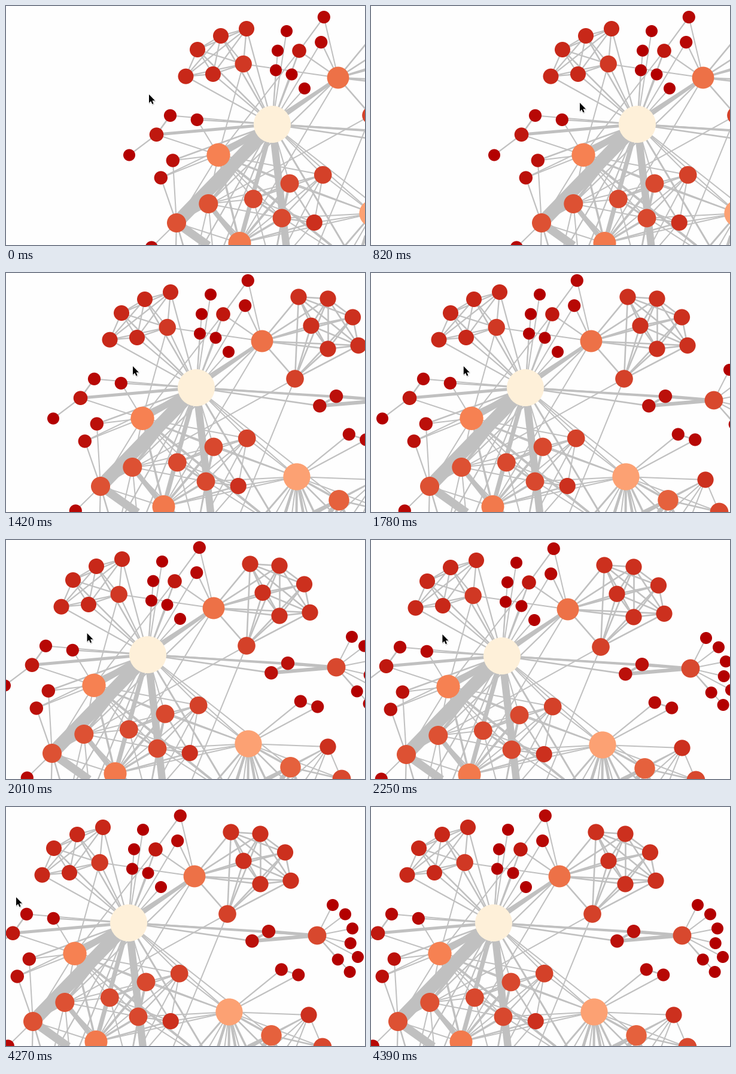
Recreate the animation shown at these times as a matplotlib script. Size 600 px wide and 400 px high, loop 5230 ms.

```python
from itertools import combinations

import matplotlib.pyplot as plt
import numpy as np
from matplotlib.animation import FuncAnimation
from matplotlib.collections import LineCollection, PatchCollection
from matplotlib.colors import LinearSegmentedColormap
from matplotlib.patches import Circle, Polygon

W, H, DPI = 600, 400, 100
LOOP, TICK = 5230, 10
RAMP = LinearSegmentedColormap.from_list("heat", ["#b30000", "#fc8d59", "#fef0d9"], N=512)

nodes, links = {}, []


def node(name, x, y, degree):
    nodes[name] = (x, y, degree)


def group(key, degree, *points):
    for i, (x, y) in enumerate(points):
        node(f"{key}{i}", x, y, degree)


def link(weight, start, ends):
    links.extend((start, end, weight) for end in ends.split())


def clique(weight, names):
    links.extend((a, b, weight) for a, b in combinations(names.split(), 2))


# Main characters of the network
node("hub", 205, 194, 36)
node("ne", 315, 116, 15)
node("west", 115, 245.3, 17)
node("sw", 45, 359, 11)
node("mid", 98.3, 327, 11)
node("low", 150.5, 393, 16)
node("se", 373, 343, 22)
node("south", 240, 498, 19)
node("east", 520, 215, 10)

# Clusters around them
group("a", 6, (80, 69), (119, 46), (162, 34), (60.5, 113.7), (106, 110))
node("a5", 156.7, 93, 8)
group("s", 1, (229, 38), (214, 70.7), (211, 103.5), (237.5, 110.5), (259, 134))
node("p", 250, 71, 4)
node("q", 291.3, 14.6, 2)
node("r", 286.7, 56.6, 2)
group("b", 7, (376, 42), (425, 45), (466.5, 76), (397, 90.2), (425, 129), (476, 123.3))
node("b6", 370, 179, 9)
group("l", 2, (34.5, 179.3), (79.3, 186.4), (3.3, 400))
group("v", 4, (11.5, 211.2))
group("u", 1, (-34, 245.5))
group("t", 3, (38.8, 254.5), (18.8, 283.5))
group("c", 10, (173.3, 319), (221, 351), (234, 293))
node("c3", 289.7, 278.7, 9)
node("c4", 275.2, 358.5, 7)
group("e", 1, (546, 164), (567, 179.5), (579, 203.3), (575.7, 228), (588, 251),
      (554.7, 255.3), (574.6, 276))
group("h", 3, (439, 208.2), (411.3, 224.3))
group("i", 2, (460.3, 272), (488.7, 281))
node("n0", 443.5, 382.3, 13)
node("n1", 506, 348, 7)
node("n2", 529, 402, 10)
group("m", 1, (345, 430), (392, 450), (372, 475), (415, 490), (350, 520), (300, 470),
      (430, 460), (470, 440), (330, 490))
group("o", 1, (205, 440), (85, 495), (42, 480), (70, 450), (110, 450))

# Hub
link(31, "hub", "sw")
link(19, "hub", "south")
link(17, "hub", "west")
link(12, "hub", "low")
link(9, "hub", "ne")
link(8, "hub", "v0")
link(7, "hub", "mid")
link(5, "hub", "east")
link(4, "hub", "m0")
link(3, "hub", "a0 a1 p t0 h0 h1")
link(2, "hub", "a2 a3 a4 a5 l1 o1 o2")
link(1, "hub", "s0 s1 s2 s3 s4 r l0 t1 c0 c1 c2 c3 se n0")

# Upper clusters
clique(2, "a0 a1 a2 a3 a4 a5")
clique(3, "ne b0 b1 b2 b3 b4 b5 b6")
link(5, "ne", "west")
link(2, "ne", "p r mid")
link(1, "ne", "q a5 low")
link(2, "q", "p")
link(1, "b6", "sw south")

# Left side
link(1, "west", "a5 p l1 v0 t0 t1 mid sw c0 c1 c3 se")
link(2, "west", "c2")
link(5, "west", "low")
link(6, "west", "m0")
link(3, "v0", "l0")
link(2, "v0", "u0")
link(1, "sw", "t0 l2 low")
link(2, "sw", "t1 o2")
link(3, "sw", "o1")
link(4, "sw", "mid")
link(21, "sw", "south")

# Middle
link(13, "mid", "low")
link(1, "mid", "c0 c1 c2 o3 o4")
link(2, "mid", "o0")
link(6, "low", "c2")
link(5, "low", "c1")
link(4, "low", "c0")
link(3, "low", "c4 o0")
link(1, "low", "c3 se")
link(4, "c0", "c1 c2")
link(6, "c1", "c2")
link(2, "c3", "c0 c1 c2")
link(3, "c4", "c1 c2")
link(1, "c4", "c0 c3")
link(1, "o0", "c0 c1 c2 c3 c4")
link(1, "m0", "c0")

# Right side
link(1, "east", "e0 e1 e2 e3 e4 e5 e6")
link(8, "east", "h0")
link(10, "east", "h1")
link(6, "h0", "h1")
link(2, "se", "i0 i1 m3 m8")
link(3, "i0", "i1")
link(7, "se", "m0 m1")
link(6, "se", "m2")
link(5, "se", "m6 n0")
link(4, "se", "south")
link(3, "se", "m7")
link(1, "se", "c1 c2 c3 c4 m4 m5 n1 n2")
link(12, "n0", "m1")
link(10, "n0", "m0")
link(7, "n0", "m7")
link(5, "n0", "south")
link(3, "n0", "n2 m2 m3 m6")
link(1, "n1", "n0 n2 m0 m1 m6 m7")
link(2, "n2", "m0 m1 m7")


def line_width(weight):
    px = 2 + 20 * ((weight - 1) / 30) ** 1.3
    return px * 72 / DPI


# Moments at which the picture may change
STEPS = np.array([0, 230, 350, 470, 580, 700, 820, 940, 1060, 1180, 1300, 1420, 1540,
                  1660, 1780, 1890, 2010, 2130, 2250, 2370, 2490, 2600, 2720, 4270, 4390])

# time, x, y
PAN = np.array([(940, 240, 4), (1060, 224, 3), (1180, 192, 2), (1300, 152, 0),
                (1420, 113, -2), (1540, 92, -2), (1780, 53, -2), (1890, 42, -2),
                (2010, 32, -2), (2130, 23, -1), (2250, 14, 0), (2370, 6, 0),
                (2490, 6, 0), (2720, 0, 0)]).T
GRIP = np.array([109, 158])
START, NEAR, EXIT = np.array([239, 148]), np.array([343, 162.5]), np.array([17, 151])


def pan_at(t):
    return np.array([np.interp(t, PAN[0], axis) for axis in PAN[1:]])


def pointer_at(t):
    """Tip of the pointer on the stage, or None once it has left."""
    if t >= 4390:
        return None
    if t >= 4270:
        return EXIT
    if t < 820:
        s = np.clip((t - 110) / 590, 0, 1) if t else 0
        return START + (NEAR - START) * s * s * (3 - 2 * s)
    lag = np.interp(t, [940, 1060, 1180, 1420, 2720], [0, 9, 12, 10, 0])
    return pan_at(t) + GRIP - (lag, 0)


fig = plt.figure(figsize=(W / DPI, H / DPI), dpi=DPI, facecolor="#fefefe")
ax = fig.add_axes([0, 0, 1, 1])
ax.axis("off")

ax.add_collection(LineCollection(
    [(nodes[a][:2], nodes[b][:2]) for a, b, _ in links],
    linewidths=[line_width(w) for *_, w in links], colors="#c0c0c0", zorder=1), autolim=False)
ax.add_collection(PatchCollection(
    [Circle((x, y), 10 + 0.6 * (d - 1)) for x, y, d in nodes.values()],
    facecolors=[RAMP((d - 1) / 35) for *_, d in nodes.values()],
    linewidths=0, zorder=2), autolim=False)

ARROW = np.array([(0, 0), (0, 14.2), (3.2, 11.2), (5.4, 16.2), (7.6, 15.2), (5.5, 10.3), (10, 10.3)])
shadow = ax.add_patch(Polygon(ARROW, fc="black", ec="black", lw=1.2, alpha=0.18, zorder=3))
arrow_rim = ax.add_patch(Polygon(ARROW, fc="white", ec="white", lw=1.4, zorder=4))
arrow = ax.add_patch(Polygon(ARROW, fc="black", lw=0, zorder=5))
POINTER = ((shadow, (0.5, 1.2)), (arrow_rim, (0, 0)), (arrow, (0, 0)))


def draw(i):
    t = STEPS[np.searchsorted(STEPS, i * TICK, side="right") - 1]
    pan, tip = pan_at(t), pointer_at(t)
    ax.set_xlim(-pan[0], W - pan[0])
    ax.set_ylim(H - pan[1], -pan[1])
    for part, shift in POINTER:
        part.set_visible(tip is not None)
        if tip is not None:
            part.set_xy(ARROW + tip - pan + shift)
    return ()


anim = FuncAnimation(fig, draw, frames=LOOP // TICK, interval=TICK, repeat=True,
                     repeat_delay=0, blit=False)
plt.show()
```
